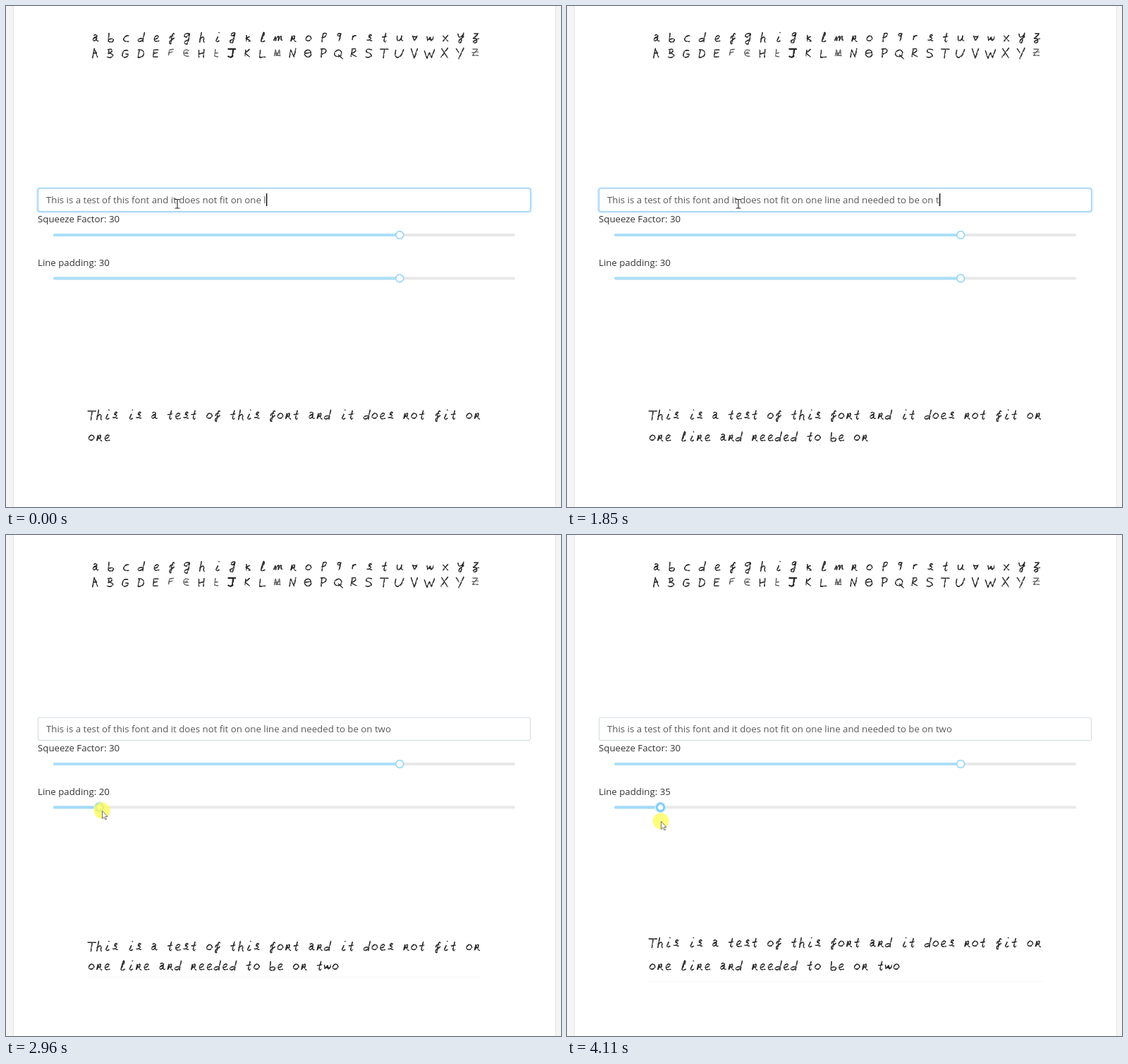
An HTML page with a canvas that plays this animation: 787 px wide and 711 px high, repeating every 4.17 s.

```html
<!DOCTYPE html>
<html lang="en">
<head>
<meta charset="utf-8">
<title>Handwriting font demo</title>
<style>
  html, body { margin: 0; width: 100%; height: 100%; overflow: hidden; background: #f5f5f5; }
  canvas { display: block; }
</style>
</head>
<body>
<canvas id="stage" width="787" height="711"></canvas>
<script>
const ctx = document.getElementById('stage').getContext('2d');
const LOOP = 4170;
const FONT = '13.25px "Open Sans", "Noto Sans", sans-serif';
const MESSAGE = 'This is a test of this font and it does not fit on one line and needed to be on two';
const LINE_BREAK = 51;
const BLUR_TIME = 2330;
const RAIL = { x: 67, width: 655, min: 15, max: 35 };

// Pen strokes, in pixels around the middle of each letter cell.
const roundLetters = {
  a: 'M-3-3Q-1-6 2-3L1 3Q3 6 5 4M2 0Q-4-1-4 3Q-3 6 1 2M-3 0L2-2',
  c: 'M4-3Q-1-4-4 2Q-4 6 4 5',
  e: 'M-4 2Q3 1 3-2Q0-5-3 0Q-5 6 2 5L4 4',
  o: 'M0-3Q-5-1-4 3Q0 6 4 2Q4-3-1-3',
  s: 'M-1-2Q1-6 3-4Q3-2-1-1Q4 0 2 2Q-1 4-4 3M1 4L4 4',
  m: 'M-7 4L-4-2L-4 4Q-1-3 1-2L0 4Q3-3 5-2Q3 5 7 3',
  n: 'M-2-3L-4 5L0-2Q2-4 2-2L1 3Q3 6 4 5M-3 2L2 1',
  r: 'M-2-3L-3 3M-2-1Q0-4 3-3',
  u: 'M-4-3Q-5 5-2 4Q2 3 3-3Q1 5 5 4'
};
const angularLetters = {
  k: 'M-2-4L-2 5M3-2Q-1 0-3 1Q2 2 4 5L1 5',
  v: 'M-4-3L-1 4L4-3M-3-2Q0-1 3-2',
  w: 'M-5-2L-4 4L0-1L1 4Q5 2 5-2M-3 2L2 2',
  x: 'M-4-3L4 5M4-4L-4 5'
};
const tallLetters = {
  b: 'M-3-7L-4 5Q2 8 4 3Q3 0-3 2',
  d: 'M5-8Q3 0 2 6M2 1Q-4 0-5 4Q-3 7 2 3',
  f: 'M4-5Q2-9 0-1L-1 8Q-4 10-3 5L4 0M-3 1Q-3-4 3-2',
  h: 'M-1-8L-4 7M-4 2Q1-3 3 0Q1 6 4 7',
  i: 'M1-2L-2 4Q-1 7 3 4M2-7L3-8',
  l: 'M1-8Q-3 2-3 5Q-1 7 3 4M1-8Q4-7-2 2',
  t: 'M2-7L-1 4Q0 7 3 4M-4-1L4-2'
};
const tailLetters = {
  g: 'M4-6Q-4-7-4-2Q0 1 4-6Q3 4 0 9Q-5 9-3 5L4 2',
  j: 'M4-7Q-2-8-2-3Q2-2 4-7L0 7Q-4 8-4 4L3 1',
  p: 'M-1-6L-3 6M-1-6Q5-8 4-4Q2 0-4 0',
  q: 'M3-6Q-3-7-2-3Q1-1 3-6L0 5',
  y: 'M-4-6Q-4 0 0-1Q4-3 5-7L0 7Q-4 8-2 3L5-2',
  z: 'M-3-6L4-6L-4 1Q4 0 1 6Q-3 9-4 5L5 1'
};
const curvedCapitals = {
  B: 'M-4-5Q5-8 2-2L-2 0Q7 1 3 5Q-1 7-5 5M-2-4L-3 1',
  C: 'M4-4Q-4-6-5 3Q-3 8 4 4L4 1L0 1',
  D: 'M-2-5L-4 6Q5 6 5-1Q3-6-4-5',
  G: 'M4-4Q-3-7-4-1Q-4 5 4 4M3 0L-2 0L2-2',
  J: 'M-6-6L6-6M2-6L1 4Q-2 7-6 4',
  O: 'M0-5Q-6-4-5 2Q0 9 5 2Q5-5 0-5M-5 0L5-1',
  P: 'M-2-6L-3 6M-4-6Q7-8 4-2Q2 1-3 1',
  Q: 'M1-5Q-6-4-6 2Q-2 7 4 3Q7-3 1-5M0 2L7 8',
  R: 'M-2-5L-4 5M-3-6Q6-8 3-3L-3 1L5 5',
  S: 'M5-5Q-4-8-4-2Q5 0 4 4Q0 7-5 5',
  U: 'M-5-5Q-8 6-2 6Q4 5 7-6'
};
const straightCapitals = {
  A: 'M-4 7L-1-7L4 6M-3 0L3-1',
  E: 'M4-5L-3-5L-4 5L4 5M-4 0L3-1',
  F: 'M4-6L-2-5L-4 3M-4-1L3-2',
  H: 'M-4-5L-4 6M4-6L3 6M-4 1L4-1',
  I: 'M-2-6L-3 4L3 5M-2 0L2-1',
  K: 'M-2-5L-3 4M4-6L-3 0L4 5',
  L: 'M-3-5L-4 6L5 5',
  M: 'M-5 4L-3-5L-1 3L3-5L4 4M-5 1L4-1M-3 3L5 3',
  N: 'M-5 6L-3-5L2 5L5-7',
  T: 'M-6-6L7-6M1-6L-1 7',
  V: 'M-5-7L0 7L5-7',
  W: 'M-8-4L-4 7L0-1L3 6L8-6',
  X: 'M-5-7L5 7M5-8L-6 6',
  Y: 'M-6-7L-1 0M6-8L-2 8',
  Z: 'M-4-6L4-6L-4 3L5 3M-5-1L5-2'
};
const glyphs = {};
for (const group of [roundLetters, angularLetters, tallLetters, tailLetters, curvedCapitals, straightCapitals])
  for (const letter in group) glyphs[letter] = new Path2D(group[letter]);

// [time, characters typed, characters handwritten]
const typing = [
  [0, 56, 54], [70, 57, 56], [140, 59, 57], [210, 60, 59], [280, 62, 60], [350, 64, 62],
  [420, 65, 64], [490, 67, 65], [550, 68, 67], [620, 69, 68], [700, 71, 69], [770, 72, 72],
  [970, 73, 72], [1040, 73, 73], [1180, 74, 73], [1250, 75, 74], [1310, 75, 75], [1450, 76, 75],
  [1580, 77, 76], [1650, 78, 77], [1720, 79, 78], [1790, 80, 79], [1850, 81, 80],
  [1920, 82, 81], [1990, 83, 82], [2120, 83, 83]
];
// [time, pointer x, pointer y, pointer look, padding slider value]
const pointing = [
  [0, 243, 281, 'text', 30],
  [2120, 240, 302, 'arrow', 30], [2190, 234, 345, 'arrow', 30], [2260, 231, 384, 'arrow', 30],
  [2330, 230, 387, 'press', 20], [2460, 230, 387, 'grab', 20], [2600, 224, 389, 'arrow', 20],
  [2670, 226, 388, 'grab', 20], [2740, 224, 388, 'press', 20], [2810, 195, 390, 'press', 19],
  [2880, 160, 391, 'press', 18], [2950, 136, 391, 'press', 17], [3030, 133, 389, 'grab', 17],
  [3240, 460, 388, 'press', 21], [3310, 498, 388, 'press', 27], [3380, 610, 383, 'press', 28],
  [3450, 690, 378, 'press', 32], [3520, 736, 372, 'press', 34], [3600, 739, 371, 'press', 35],
  [3680, 727, 380, 'arrow', 35], [3760, 718, 386, 'grab', 35], [3830, 718, 386, 'press', 35],
  [3900, 440, 395, 'press', 35], [3970, 330, 400, 'press', 26], [4040, 140, 404, 'press', 23],
  [4110, 133, 406, 'press', 17]
];
// The label and the layout follow the slider only after release.
const released = [[0, 30], [2400, 20], [3030, 17], [3830, 35]];

function stateAt(rows, t) {
  let current = rows[0];
  for (const row of rows) if (row[0] <= t) current = row;
  return current;
}

// A thin line plus a broken, shifted one gives uneven pen pressure.
function drawGlyph(letter, x, y) {
  const path = glyphs[letter];
  if (!path) return;
  ctx.save();
  ctx.translate(x, y);
  ctx.scale(0.92, 1);
  ctx.lineJoin = 'round';
  ctx.strokeStyle = 'FGIMZ'.includes(letter) ? '#666' : '#262626';
  ctx.lineWidth = letter === 'J' ? 1.9 : 1.05;
  ctx.stroke(path);
  ctx.translate(0.6, 0.4);
  ctx.setLineDash([6, 2.5]);
  ctx.stroke(path);
  ctx.restore();
}

function handwrite(text, x, y, pitch) {
  [...text].forEach((letter, i) => drawGlyph(letter, x + i * pitch, y));
}

function label(text, x, y, color) {
  ctx.font = FONT;
  ctx.fillStyle = color;
  ctx.fillText(text, x, y);
}

function bar(x, y, width, height, radius, color) {
  ctx.beginPath();
  ctx.roundRect(x, y, width, height, radius);
  ctx.fillStyle = color;
  ctx.fill();
}

function drawInput(text, focused) {
  if (focused) bar(43, 257, 703, 37, 5, '#d3eafc');
  bar(45, 258.5, 699, 33.5, 3, focused ? '#8fcdf9' : '#d0dae0');
  bar(46, 259.5, 697, 31.5, 2, '#fff');
  label(text, 57, 280, '#595959');
  if (focused) {
    ctx.fillStyle = '#000';
    ctx.fillRect(Math.round(57 + ctx.measureText(text).width), 266, 1.3, 18);
  }
}

function drawSlider(y, value, active) {
  const filled = RAIL.width * (value - RAIL.min) / (RAIL.max - RAIL.min);
  bar(RAIL.x, y - 2, RAIL.width, 4, 2, '#e8e8e8');
  bar(RAIL.x, y - 2, filled, 4, 2, active ? '#a2dbfa' : '#abdff8');
  ctx.beginPath();
  ctx.arc(RAIL.x + filled, y, 5.4, 0, Math.PI * 2);
  ctx.fillStyle = '#fff';
  ctx.fill();
  if (active) {
    ctx.lineWidth = 5.5;
    ctx.strokeStyle = '#d2edfc';
    ctx.stroke();
  }
  ctx.lineWidth = active ? 2 : 1.7;
  ctx.strokeStyle = active ? '#6fc6f4' : '#98d7f8';
  ctx.stroke();
}

const ibeam = new Path2D('M-3.5-6.5H-1Q0-6.5 0-5.5Q0-6.5 1-6.5H3.5M0-6V6M-3.5 6H3.5');
const arrow = new Path2D('M.5.5V11.5L3 9.2L5 13L6.6 12.3L4.8 8.5H8Z');
const hand = new Path2D('M-3 7L-6 2Q-8-1-6-1L-4 1L-5-4Q-4-6-3-4Q-2-8 0-5Q1-8 3-5Q5-6 5-3Q7-4 7-1L6 3L4 7Z');
const fingers = new Path2D('M-3-4L-2 0M0-5V0M3-5L2.5 0M5-3L4.5 0');

function drawPointer(x, y, look) {
  ctx.save();
  ctx.translate(x, y);
  if (look === 'press') {
    ctx.beginPath();
    ctx.arc(0, 0, 11.5, 0, Math.PI * 2);
    ctx.fillStyle = 'rgba(255, 252, 90, .78)';
    ctx.fill();
  }
  ctx.lineWidth = look === 'text' || look === 'grab' ? 1.1 : 0.8;
  ctx.strokeStyle = look === 'text' || look === 'grab' ? '#222' : '#555';
  ctx.fillStyle = '#fff';
  if (look === 'text') ctx.stroke(ibeam);
  else {
    const shape = look === 'grab' ? hand : arrow;
    ctx.fill(shape);
    ctx.stroke(shape);
    if (look === 'grab') ctx.stroke(fingers);
  }
  ctx.restore();
}

function drawPage() {
  ctx.fillStyle = '#f5f5f5';
  ctx.fillRect(0, 0, 787, 711);
  ctx.fillStyle = '#e4e4e4';
  ctx.fillRect(10, 0, 770, 711);
  ctx.fillStyle = '#fff';
  ctx.fillRect(11, 0, 768, 711);
  handwrite('abcdefghijklmnopqrstuvwxyz', 127, 45, 21.56);
  handwrite('ABCDEFGHIJKLMNOPQRSTUVWXYZ', 126, 67, 21.56);
}

function drawSample(count, padding) {
  const text = MESSAGE.slice(0, count);
  handwrite(text.slice(0, LINE_BREAK), 121, 590.7 - 0.335 * padding, 11.16);
  handwrite(text.slice(LINE_BREAK), 121, 611.7, 11.16);
  if (padding !== 30) {
    ctx.fillStyle = '#f8f8f8';
    ctx.fillRect(115, Math.round(620.5 + 0.345 * padding), 560, 1);
  }
}

function render(t) {
  const [, typed, written] = stateAt(typing, t);
  const [, x, y, look, value] = stateAt(pointing, t);
  const padding = stateAt(released, t)[1];
  drawPage();
  drawInput(MESSAGE.slice(0, typed), t < BLUR_TIME);
  label('Squeeze Factor: 30', 45, 307, '#333');
  drawSlider(325, 30, false);
  label('Line padding: ' + padding, 45, 369, '#333');
  drawSlider(386.5, value, look === 'press');
  drawSample(written, padding);
  drawPointer(x, y, look);
}

const start = performance.now();
function tick() {
  render((performance.now() - start) % LOOP);
  requestAnimationFrame(tick);
}
tick();
</script>
</body>
</html>
```
